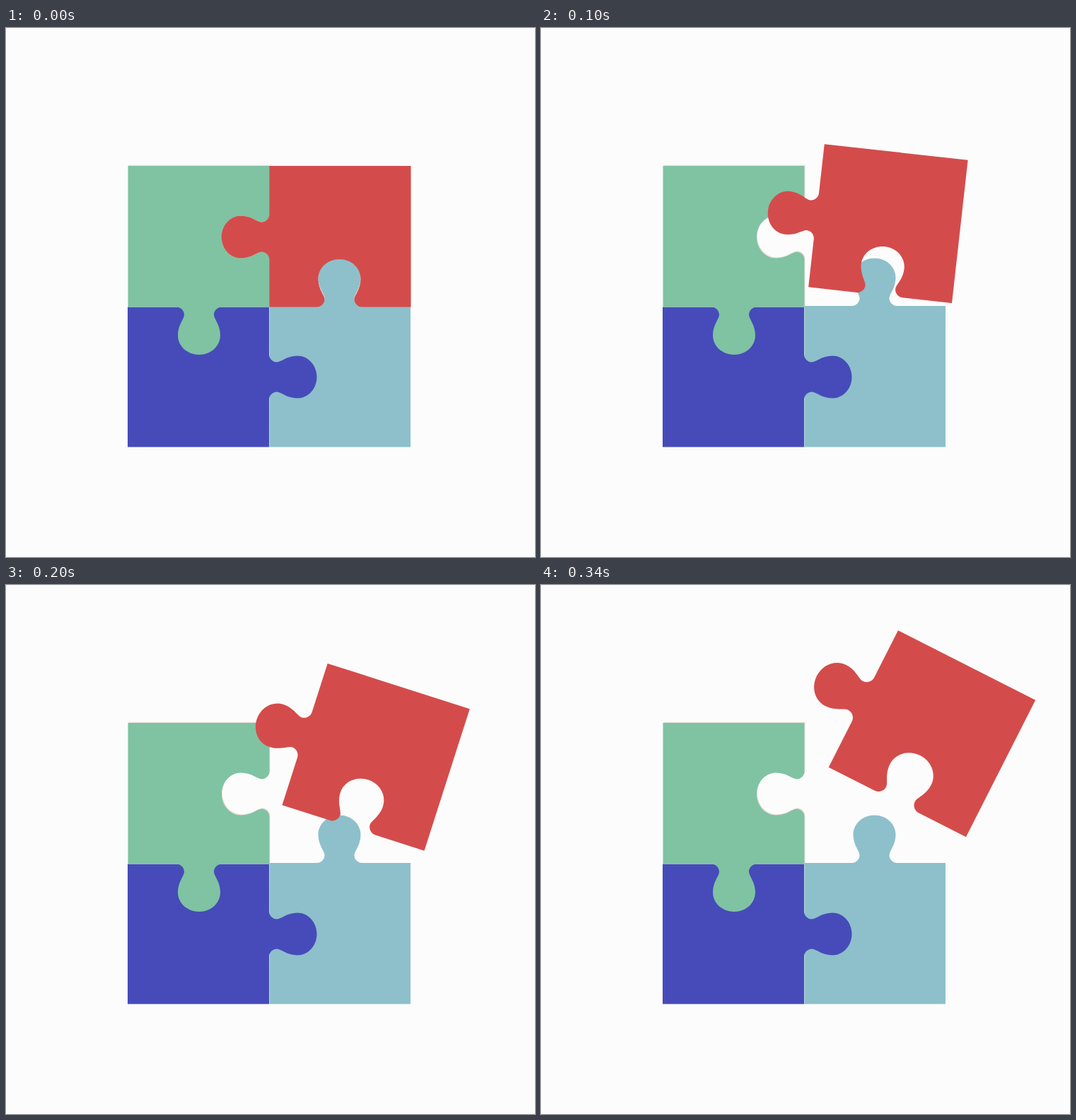
Write an HTML page that moves like this. It is 748 px wide and 748 px high and loops after 3.96 s.

```html
<!DOCTYPE html>
<html lang="en">
<head>
<meta charset="utf-8">
<title>Puzzle</title>
<style>
  html, body { margin: 0; width: 100%; height: 100%; overflow: hidden; background: #fcfcfc; }
  svg { display: block; width: 100vw; height: 100vh; }
</style>
</head>
<body>
<svg viewBox="0 0 748 748">
  <path id="rim" fill="#ebdcd7" transform="translate(.9 -1.2)"/>
  <path id="teal" fill="#8dc0cb"/>
  <path d="M372.3 394.5V592.5" stroke="#b9d3dc"/>
  <path id="blue" fill="#464bb9"/>
  <path id="green" fill="#7fc3a3"/>
  <path id="red" fill="#d34c4b"/>
</svg>
<script>
const LOOP = 3960, STEP = 20, LAST_STEP = 17;

// Half widths of the knob, and how far it reaches out
const BASE = 32, NECK = 21, HEAD = 30, REACH = 67.5;
const L = [-1, 0], R = [1, 0], U = [0, -1], D = [0, 1];

// Knob centred on an edge point, pointing along `out`, traced along `dir`
function knob(x, y, out, dir) {
  const at = (u, v) => `${x + out[0] * u + dir[0] * v} ${y + out[1] * u + dir[1] * v} `;
  return 'L' + at(0, -BASE)
    + 'C' + at(0, 6 - BASE) + at(5, -NECK) + at(11, -NECK)
    + 'S' + at(25, -HEAD) + at(40, -HEAD)
    + 'S' + at(REACH, -17) + at(REACH, 0)
    + 'S' + at(55, HEAD) + at(40, HEAD)
    + 'S' + at(17, NECK) + at(11, NECK)
    + 'S' + at(0, BASE - 6) + at(0, BASE);
}

const shapes = {
  green: `M172.5 195H372.5${knob(372.5, 295.5, L, D)}V394.5${knob(273, 394.5, D, L)}H172.5Z`,
  blue: `M172 394.5H372${knob(372, 493.5, R, D)}V592.5H172Z`,
  teal: `M372.5 393${knob(471.5, 393, U, R)}H572V592.5H372.5Z`,
  red: `M372.3 195H572.5V394.5${knob(471.5, 394.5, U, L)}H372.3${knob(372.3, 295.5, L, U)}Z`
};
shapes.rim = shapes.green;
for (const id in shapes) document.getElementById(id).setAttribute('d', shapes[id]);
const red = document.getElementById('red');

// Speeds up evenly, cruises, then slows down evenly
function ease(step, length, ramp = 4.4) {
  if (step >= length) return 1;
  if (step > length / 2) return 1 - ease(length - step, length, ramp);
  const distance = step < ramp ? step * step / (2 * ramp) : step - ramp / 2;
  return distance / (length - ramp);
}

function draw(time) {
  const step = Math.min(LAST_STEP, Math.floor(time / STEP));
  const p = ease(step, LAST_STEP);
  const bow = 0.9 * Math.sin(Math.PI * p);
  const x = 472.4 + 80.5 * p + bow;
  const y = 294.8 - 84.5 * p + bow;
  const angle = 26.9 * ease(step, 16.2);
  red.setAttribute('transform',
    `translate(${x} ${y}) rotate(${angle}) scale(${1 + 0.088 * p}) translate(-472.4 -294.8)`);
}

let start;
function tick(now) {
  start ??= now;
  draw((now - start) % LOOP);
  requestAnimationFrame(tick);
}
draw(0);
requestAnimationFrame(tick);
</script>
</body>
</html>
```
